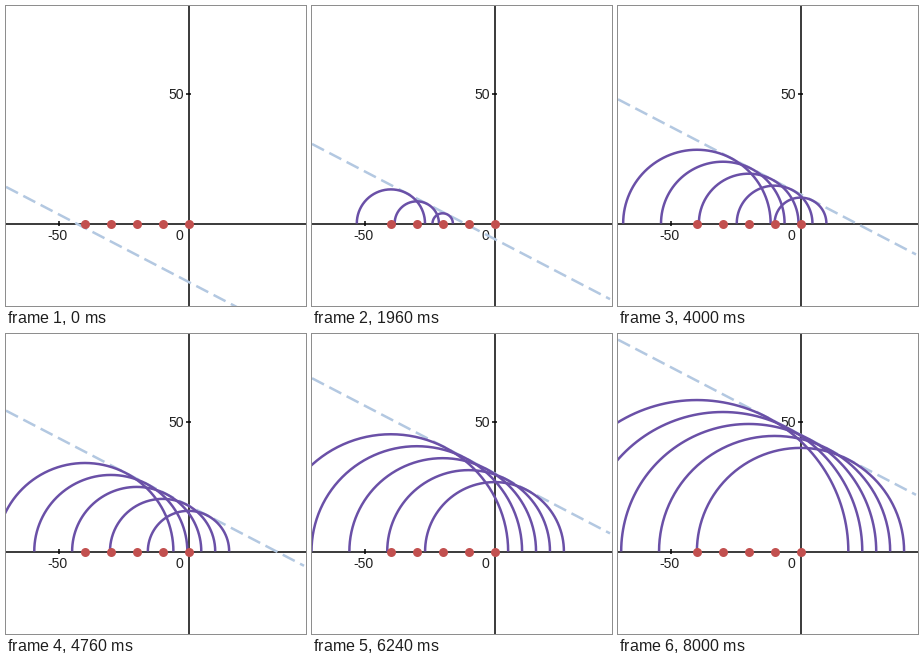
A matplotlib script that plays this animation: 300 px wide and 300 px high, repeating every 8.04 s.

```python
import numpy as np
import matplotlib.pyplot as plt
from matplotlib.animation import FuncAnimation

SIZE, DPI = 300, 100
FRAMES, STEP_MS = 201, 40
OX, OY, UNIT = 182.5, 217.5, 2.59      # origin and pixels per unit
ANGLE = 0.48                           # tilt of the wavefront
CENTRES = np.arange(-40, 1, 10)
RIGHT = 298                            # curves stop just short of the edge

PURPLE, RED, BLUE = "#6a50a7", "#c2504f", "#b3c8e1"


def pt(px):
    return px * 72 / DPI


fig = plt.figure(figsize=(SIZE / DPI, SIZE / DPI), dpi=DPI, facecolor="white")
ax = fig.add_axes([0, 0, 1, 1])
ax.set_xlim(0, SIZE)
ax.set_ylim(SIZE, 0)
ax.axis("off")


def stroke(xs, ys, width, color="black", z=1, **kw):
    return ax.plot(xs, ys, color=color, lw=pt(width), zorder=z,
                   solid_capstyle="butt", dash_capstyle="butt", **kw)[0]


def label(x, y, text, ha):
    ax.text(x, y, text, ha=ha, va="baseline", fontsize=pt(14),
            family="Liberation Sans", color="#222222", zorder=1)


stroke([0, SIZE], [OY, OY], 1.5)
stroke([OX, OX], [0, SIZE], 1.5)
tick_x, tick_y = OX - 50 * UNIT, OY - 50 * UNIT
stroke([tick_x, tick_x], [OY - 2.5, OY + 2.5], 1.5)
stroke([OX - 2.5, OX + 2.5], [tick_y, tick_y], 1.5)
label(51, 234, "-50", "center")
label(177.5, 234, "0", "right")
label(177.5, 93, "50", "right")

front = stroke([], [], 2.5, BLUE, 2)
front.set_linestyle((0, (13.5 / 2.5, 6 / 2.5)))
waves = [stroke([], [], 2.5, PURPLE, 3) for _ in CENTRES]
ax.plot(OX + CENTRES * UNIT, np.full(len(CENTRES), OY), "o", color=RED,
        ms=pt(9), mew=0, zorder=4)

theta = np.linspace(0, np.pi, 181)
line_x = np.array([0, RIGHT])


def update(i):
    reach = -20 + 0.3 * i
    crossing = OY - reach * UNIT / np.cos(ANGLE)
    front.set_data(line_x, crossing + np.tan(ANGLE) * (line_x - OX))
    for c, wave in zip(CENTRES, waves):
        r = reach - c * np.sin(ANGLE)
        wave.set_visible(r > 0)
        wave.set_data(OX + (c + r * np.cos(theta)) * UNIT,
                      OY - r * np.sin(theta) * UNIT)
    return [front, *waves]


anim = FuncAnimation(fig, update, frames=FRAMES, interval=STEP_MS,
                     repeat=True, repeat_delay=0, blit=False)
plt.show()
```
